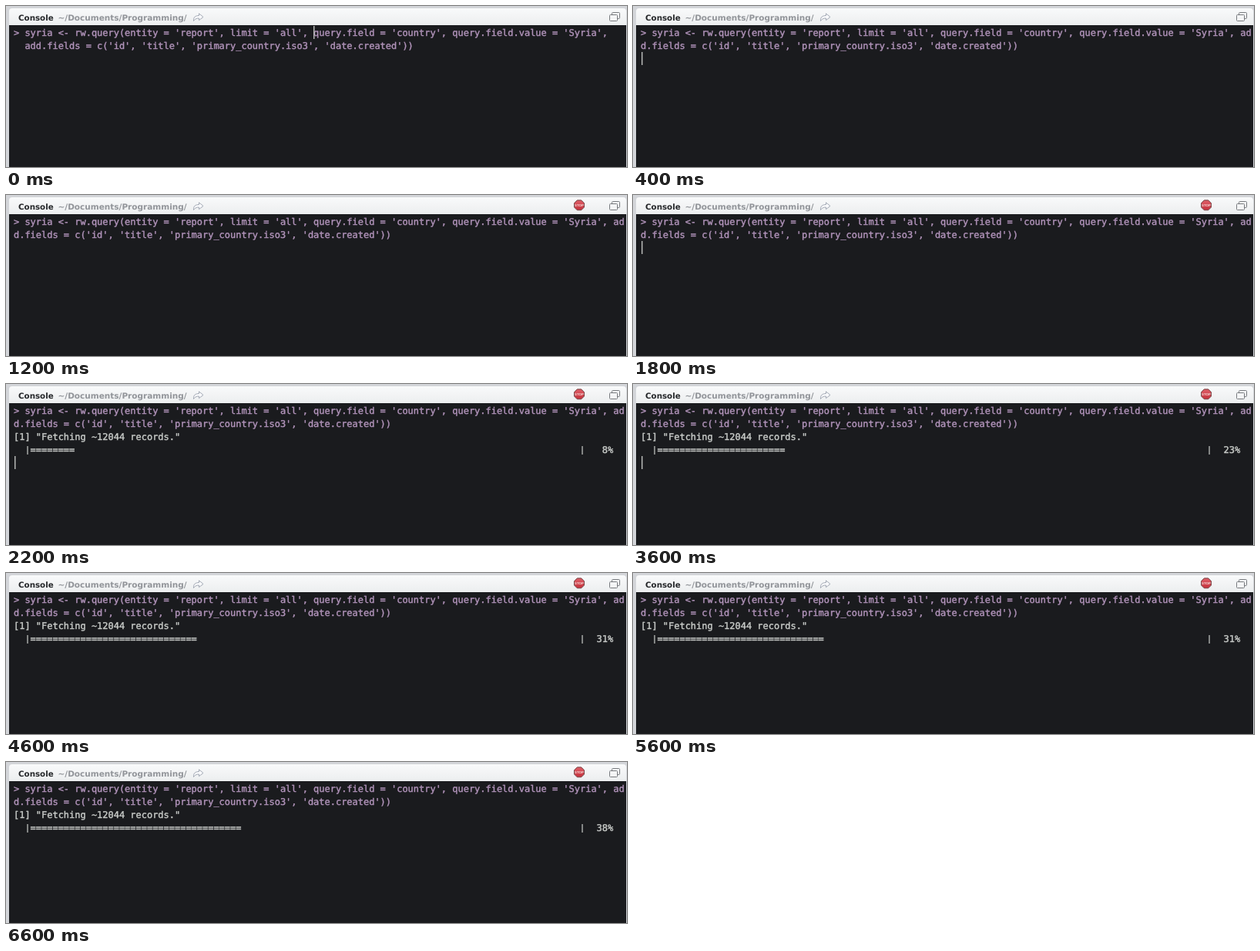
Write an HTML page with a canvas that moves like this. It is 806 px wide and 210 px high and loops after 6.8 s.

```html
<!DOCTYPE html>
<html lang="en">
<head>
<meta charset="utf-8">
<title>Console</title>
<style>
  html, body { margin: 0; width: 100%; height: 100%; overflow: hidden; background: #d3d5d9; }
  canvas { display: block; }
</style>
</head>
<body>
<canvas id="stage" width="806" height="210"></canvas>
<script>
const ctx = document.getElementById('stage').getContext('2d');

const LOOP = 6800, TICK = 200;
const SUBMIT = 200, BUSY = 1000;
const STEPS = 13, BAR = 99;
const PROGRESS = [2000, 2600, 3200, 4000, 6000]; // start of each fetched batch
const LEFT = 10, TOP = 26, CELL = 7.2, ROW = 17;
const INPUT = '#b294bb', OUTPUT = '#c9ccc9';

const HEAD = "> syria <- rw.query(entity = 'report', limit = 'all', " +
  "query.field = 'country', query.field.value = 'Syria', ";
const TAIL = "add.fields = c('id', 'title', 'primary_country.iso3', 'date.created'))";
const COMMAND = HEAD + TAIL;
const WRAP = 110;

function label(text, x, y, font, color) {
  ctx.font = font;
  ctx.fillStyle = color;
  ctx.fillText(text, x, y);
}

// A thin outline gives the text its medium weight.
function line(text, row, color) {
  const y = TOP + row * ROW + 13;
  label(text, LEFT, y, '11.97px "DejaVu Sans Mono", monospace', color);
  ctx.strokeStyle = color;
  ctx.lineWidth = 0.4;
  ctx.strokeText(text, LEFT, y);
}

function caret(col, row) {
  ctx.fillStyle = '#b4b6b4';
  ctx.fillRect(Math.round(LEFT + col * CELL) + (col ? 0 : 1), TOP + row * ROW, 1.5, ROW);
}

function shareArrow() {
  ctx.beginPath();
  ctx.moveTo(243.5, 19.5);
  ctx.bezierCurveTo(243, 14.5, 246, 12.5, 250.5, 12.5);
  ctx.lineTo(250.5, 9.8);
  ctx.lineTo(256, 14.4);
  ctx.lineTo(250.5, 18.6);
  ctx.lineTo(250.5, 16);
  ctx.bezierCurveTo(247, 16, 245, 17, 243.5, 19.5);
  ctx.fillStyle = '#f8f9fb';
  ctx.fill();
  ctx.strokeStyle = '#a3a9b5';
  ctx.lineWidth = 1;
  ctx.stroke();
}

function windowIcon() {
  ctx.strokeStyle = '#777a7e';
  ctx.lineWidth = 1;
  for (const [x, y] of [[786.5, 8.5], [783.5, 11.5]]) {
    ctx.beginPath();
    ctx.roundRect(x, y, 10, 8, 1);
    ctx.fillStyle = '#f4f5f6';
    ctx.fill();
    ctx.stroke();
  }
}

function stopIcon() {
  const cx = 744, cy = 13.3;
  ctx.beginPath();
  for (let i = 0; i < 8; i++) {
    const a = (i + 0.5) * Math.PI / 4;
    ctx.lineTo(cx + 7 * Math.cos(a), cy + 7 * Math.sin(a));
  }
  ctx.closePath();
  const red = ctx.createLinearGradient(0, 6, 0, 20);
  red.addColorStop(0, '#e0616a');
  red.addColorStop(1, '#c4303b');
  ctx.fillStyle = red;
  ctx.fill();
  ctx.strokeStyle = '#74494b';
  ctx.lineWidth = 1;
  ctx.stroke();
  ctx.textAlign = 'center';
  label('STOP', cx, 15, 'bold 4.4px "Liberation Sans", sans-serif', '#f5dcda');
  ctx.textAlign = 'left';
}

function frame(busy) {
  ctx.fillStyle = '#d3d5d9';
  ctx.fillRect(0, 0, 806, 210);
  const header = ctx.createLinearGradient(0, 3, 0, 25);
  header.addColorStop(0, '#f9fafb');
  header.addColorStop(1, '#eceeef');
  ctx.beginPath();
  ctx.roundRect(4, 3, 801, 30, 4);
  ctx.fillStyle = header;
  ctx.fill();
  ctx.fillStyle = '#1a1b1e';
  ctx.fillRect(4, 25, 801, 185);
  label('Console', 16, 19, 'bold 10.3px "DejaVu Sans", sans-serif', '#26282b');
  label('~/Documents/Programming/', 67.5, 19, 'bold 10.5px "DejaVu Sans", sans-serif', '#92959a');
  shareArrow();
  windowIcon();
  if (busy) stopIcon();
}

function progress(batch, row) {
  const share = batch / STEPS;
  const bar = '='.repeat(Math.round(BAR * share)).padEnd(BAR);
  const percent = String(Math.round(100 * share)).padStart(3);
  line(`   ${bar}  ${percent}%`, row, OUTPUT);
  for (const col of [2, BAR + 3]) {
    ctx.fillRect(LEFT + (col + 0.5) * CELL - 0.6, TOP + row * ROW + 4, 1.2, 11);
  }
}

function draw(t) {
  frame(t >= BUSY);
  if (t < SUBMIT) {
    line(HEAD, 0, INPUT);
    line('  ' + TAIL, 1, INPUT);
    caret(54, 0);
    return;
  }
  line(COMMAND.slice(0, WRAP), 0, INPUT);
  line(COMMAND.slice(WRAP), 1, INPUT);

  const batch = PROGRESS.filter(start => start <= t).length;
  if (batch) {
    line('[1] "Fetching ~12044 records."', 2, OUTPUT);
    progress(batch, 3);
  }
  // The blink restarts whenever new output arrives.
  const since = t - (batch ? PROGRESS[batch - 1] : 400);
  if (since < 0 || since % 1000 < 500) caret(0, batch ? 4 : 2);
}

function tick() {
  const t = performance.now() % LOOP;
  ctx.textRendering = 'geometricPrecision';
  ctx.lineJoin = 'round';
  draw(Math.floor(t / TICK) * TICK);
  requestAnimationFrame(tick);
}
tick();
</script>
</body>
</html>
```
